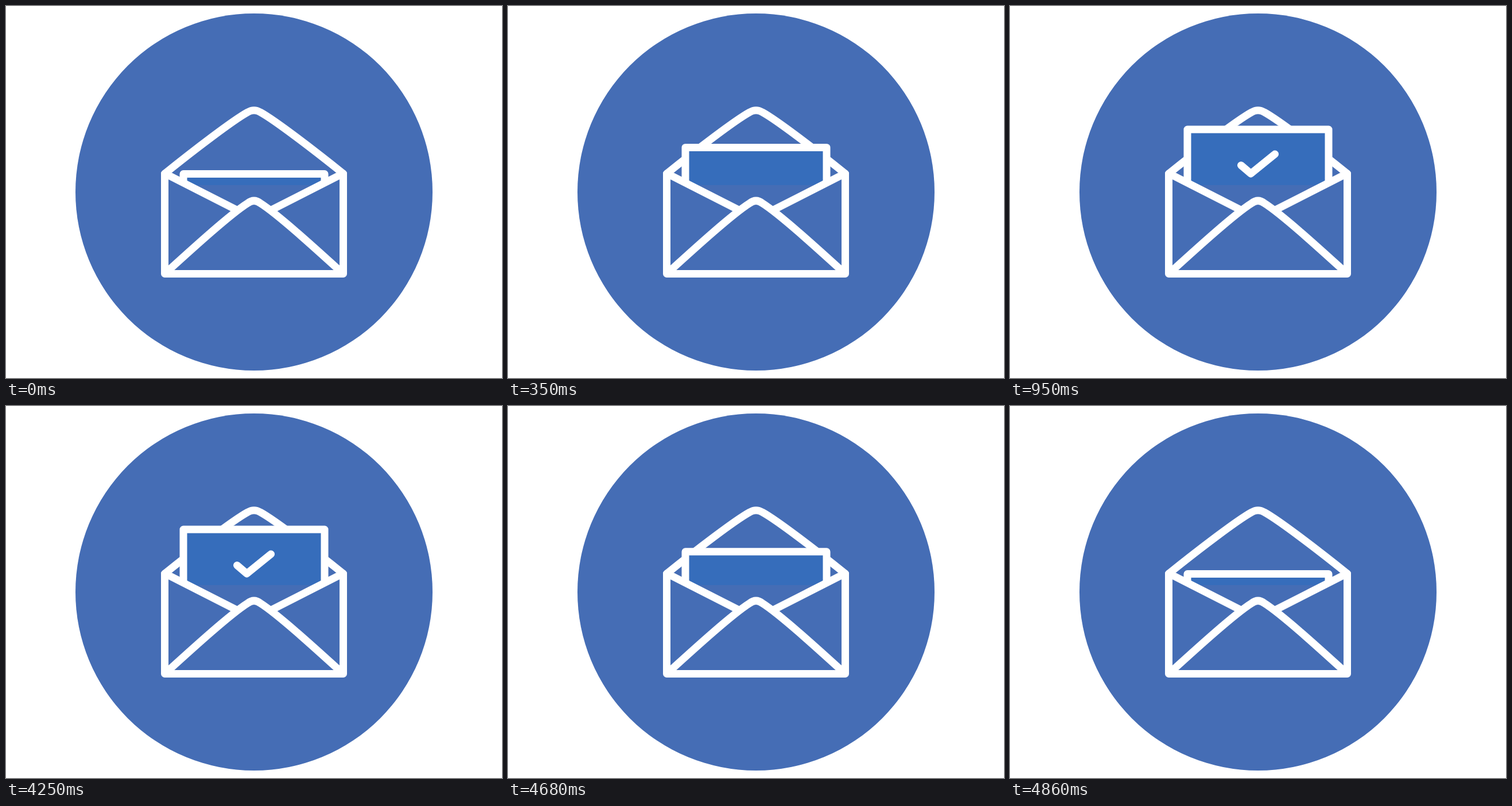
Animation, 864 px wide and 648 px high, one loop 4890 ms. Source, as an HTML page:

```html
<!DOCTYPE html>
<html lang="en">
<head>
<meta charset="utf-8">
<title>Open envelope</title>
<style>
  html, body { margin: 0; width: 100%; height: 100%; overflow: hidden; background: #fff; }
  svg { display: block; }
  path { fill: none; stroke: #fff; stroke-width: 13; stroke-linejoin: round; }
  .round { stroke-linecap: round; }
  .blue { fill: #456db5; }
  #paper { fill: #366dbb; }
</style>
</head>
<body>
<svg width="864" height="648" viewBox="0 0 864 648">
  <circle class="blue" cx="432" cy="324" r="311"/>
  <path class="round" d="M276.5 292C330 249 397 198 421 185Q432 178.5 443 185C467 198 534 249 587.5 292"/>
  <path id="paper"/>
  <path id="check" class="round" pathLength="100" d="M402.5 277.5L419.5 292 461.5 258"/>
  <path d="M276.5 291.5L432 370.6 587.5 291.5"/>
  <path class="blue" d="M276.5 466.5C320 427 390 363 421 343.5Q432 335 443 343.5C474 363 544 427 587.5 466.5"/>
  <path class="round" d="M276.5 292V466.5H587.5V292"/>
</svg>
<script>
  const LOOP = 4890, STEP = 30;
  const paper = document.getElementById('paper');
  const check = document.getElementById('check');

  // cubic-bezier(.42, 0, .58, 1), solved by bisection
  function easeInOut(x) {
    if (x <= 0 || x >= 1) return x;
    let lo = 0, hi = 1, u;
    for (let i = 0; i < 24; i++) {
      u = (lo + hi) / 2;
      const bx = 3 * u * (1 - u) * (0.42 * (1 - u) + 0.58 * u) + u ** 3;
      if (bx < x) lo = u; else hi = u;
    }
    return u * u * (3 - 2 * u);
  }

  // Eased progress that advances in fixed time steps
  function progress(t, start, steps) {
    const k = Math.floor((t - start) / STEP + 1e-6);
    return easeInOut(Math.min(1, Math.max(0, k / steps)));
  }

  function draw(t) {
    const raised = progress(t, 200, 9) - progress(t, 4500, 12);
    const ticked = progress(t, 770, 6) - progress(t, 4250, 5);
    paper.setAttribute('d', `M309 312V${292.5 - 77.5 * raised}H555V312`);
    check.style.visibility = ticked > 0 ? 'visible' : 'hidden';
    check.setAttribute('stroke-dasharray', ticked < 1 ? `${100 * ticked} 200` : 'none');
  }

  const begin = performance.now();
  function tick() {
    draw((performance.now() - begin) % LOOP);
    requestAnimationFrame(tick);
  }
  tick();
</script>
</body>
</html>
```
